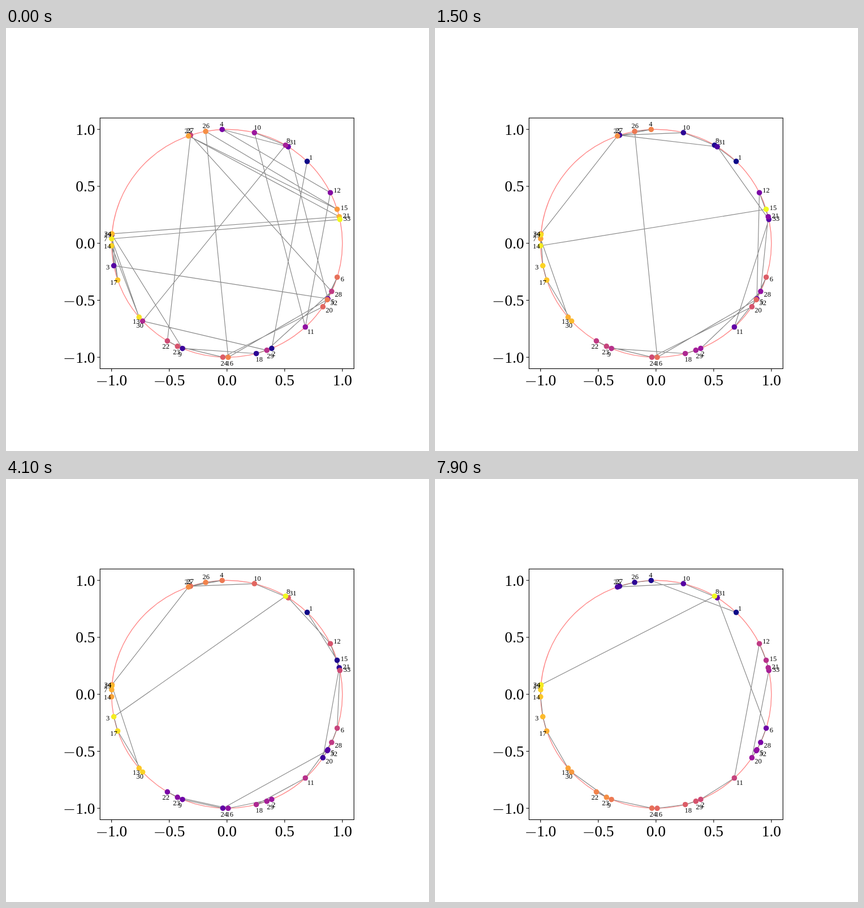
An HTML page that plays this animation: 748x748 px, repeating every 8 s.

```html
<!DOCTYPE html>
<html lang="en">
<head>
<meta charset="utf-8">
<title>Tour on a circle</title>
<style>
  html, body { margin: 0; width: 100%; height: 100%; overflow: hidden; background: #fff; }
  svg { display: block; width: 100vw; height: 100vh; }
  text { font-family: "Liberation Serif", "Noto Serif", serif; fill: #000; }
  .tick { font-size: 27.4px; }
  .label { font-size: 12.5px; }
  .axis { fill: none; stroke: #000; stroke-width: 1.1; }
  .ring { fill: none; stroke: #ff8a8a; stroke-width: 1.4; }
  .tour { fill: none; stroke: #868686; stroke-width: 1.15; stroke-linejoin: round; }
</style>
</head>
<body>
<svg viewBox="0 0 748 748">
  <g id="ring"></g>
  <polyline class="tour" id="tour"/>
  <g id="dots"></g>
  <g id="labels"></g>
  <g id="axes"></g>
</svg>
<script>
const LOOP = 8000, TICK = 100, COOLING = 8500;
const CX = 390.8, CY = 380.8, RX = 204.1, RY = 201.5, LIMIT = 1.1;
const $ = id => document.getElementById(id);

function add(parent, tag, attrs, text) {
  const el = document.createElementNS('http://www.w3.org/2000/svg', tag);
  for (const k in attrs) el.setAttribute(k, attrs[k]);
  if (text !== undefined) el.textContent = text;
  return parent.appendChild(el);
}

// label:degrees, in the order of the first tour
const first = `1:46 2:-67.2 18:-75.3 9:247.3 19:175.7 3:191.3 5:-29.1 31:57.95 4:92.4
  12:26.4 11:-47.25 10:76.25 8:59.5 30:223 29:-69.8 28:-24.95 27:108.4 22:238.9 23:244.6
  24:267.95 20:-33.8 6:-17.3 32:-29.6 16:-89.4 26:100.65 15:17.4 25:109.5 21:13.5
  34:175.2 17:198.8 14:181.2 13:220.4 7:177.7 33:12.1`.split(/\s+/).map(makeCity);

// Local search: "a~b" reverses a run, "a>c" or "a-b>c" moves it behind c
const moves = `2~8 3~27 4-31>26 11~27 33>27 21>12 11>33 13>29 15>7
  31>27 13-30>34 3>17 19>3 7>34 29~2 9~23 32>11 16>28 24>28 20>28 28>6 21>28 12>21
  19>34 14>34 19~7 24>9 16~18 32-20>24 6-28>33 26~4
  8~12 15>1 8>3 12>33 27~10 13~3 30~13 11>32 18>11 24~23 14~19
  4~26 25>27 27~25 12>1 23~29 18~2
  28-4>32 34~30 33>21 12~4`.split(/\s+/);

function makeCity(entry) {
  const [name, deg] = entry.split(':');
  const c = Math.cos(deg * Math.PI / 180), s = Math.sin(deg * Math.PI / 180);
  const x = CX + RX * c, y = CY - RY * s;
  add($('labels'), 'text', { class: 'label', x: x + 10.2 * c - 3.6, y: y - 10.1 * s + 4.6 }, name);
  return { name, x, y, dot: add($('dots'), 'circle', { cx: x, cy: y, r: 4.8 }) };
}

function improve(tour, move) {
  const [, a, b = a, c] = move.match(/^(\d+)(?:[-~](\d+))?(?:>(\d+))?$/);
  const at = (list, name) => list.findIndex(city => city.name === name);
  const rest = tour.slice(), from = at(tour, a);
  const run = rest.splice(from, at(tour, b) - from + 1);
  if (c) rest.splice(at(rest, c) + 1, 0, ...run);
  else rest.splice(from, 0, ...run.reverse());
  return rest;
}

const tours = [first];
for (const move of moves) tours.push(improve(tours[tours.length - 1], move));

// Improvements come fast at first and get rarer
function stepAt(ms) {
  const t = Math.floor(ms / TICK) * TICK / COOLING;
  return Math.min(moves.length, Math.ceil(moves.length * (1 - (1 - t) ** 1.7)));
}

// Plasma colour map
const plasma = ['0d0887', '46039f', '7201a8', '9c179e', 'bd3786',
  'd8576b', 'ed7953', 'fb9f3a', 'fdca26', 'f0f921']
  .map(h => [0, 2, 4].map(i => parseInt(h.substr(i, 2), 16)));

function colour(u) {
  const s = u * (plasma.length - 1), i = Math.min(plasma.length - 2, Math.floor(s));
  const mix = plasma[i].map((v, k) => Math.round(v + (plasma[i + 1][k] - v) * (s - i)));
  return `rgb(${mix})`;
}

function tickLabel(v, x, y, anchor) {
  add($('axes'), 'text', { class: 'tick', x, y, 'text-anchor': anchor }, Math.abs(v).toFixed(1));
  if (v < 0) {
    const left = x - (anchor === 'end' ? 54 : 36);
    add($('axes'), 'path', { class: 'axis', d: `M${left} ${y - 7}h17` });
  }
}

function drawAxes() {
  const left = CX - LIMIT * RX, bottom = CY + LIMIT * RY;
  add($('ring'), 'ellipse', { class: 'ring', cx: CX, cy: CY, rx: RX, ry: RY });
  add($('axes'), 'rect', {
    class: 'axis', x: left, y: CY - LIMIT * RY, width: 2 * LIMIT * RX, height: 2 * LIMIT * RY
  });
  for (let v = -1; v <= 1; v += 0.5) {
    const x = CX + RX * v, y = CY - RY * v;
    add($('axes'), 'path', { class: 'axis', d: `M${x} ${bottom}v5M${left} ${y}h-5` });
    tickLabel(v, x + (v < 0 ? 10.5 : 0), 632.3, 'middle');
    tickLabel(v, 157.5, y + 9.3, 'end');
  }
}

let shown;
function draw(tour) {
  if (tour === shown) return;
  shown = tour;
  $('tour').setAttribute('points', tour.map(p => p.x + ',' + p.y).join(' '));
  tour.forEach((p, i) => {
    p.dot.setAttribute('fill', colour(i / (tour.length - 1)));
    $('dots').appendChild(p.dot);
  });
}

function frame() {
  draw(tours[stepAt(performance.now() % LOOP)]);
  requestAnimationFrame(frame);
}
drawAxes();
frame();
</script>
</body>
</html>
```
